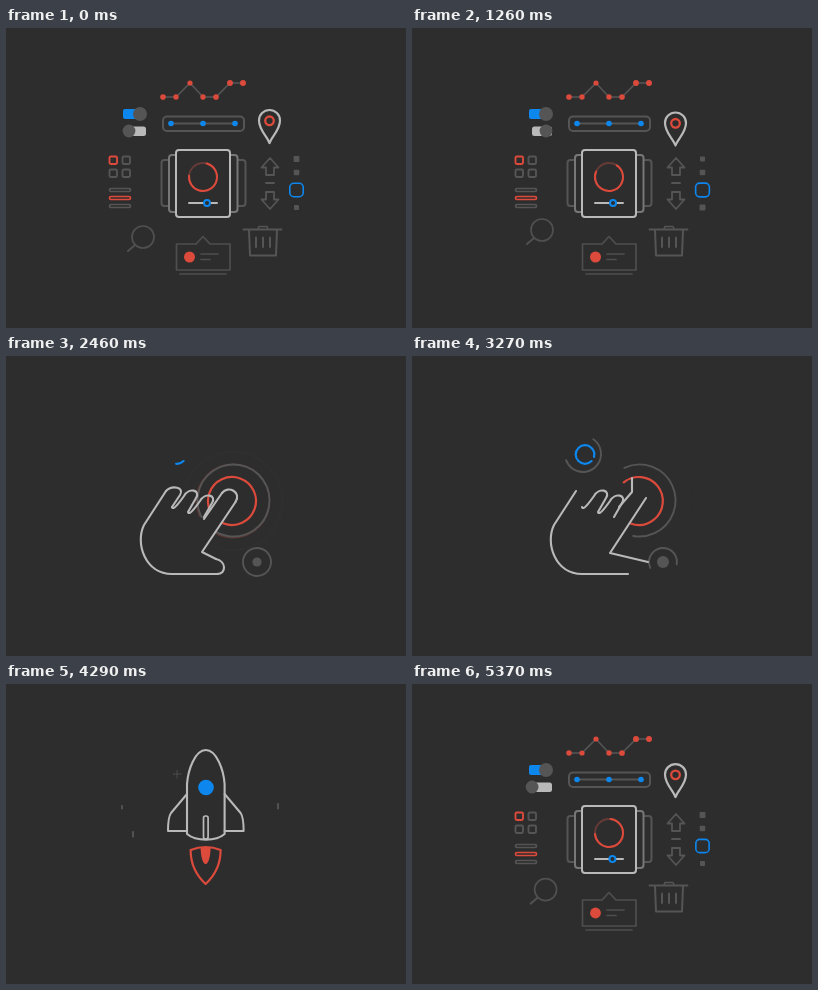
Recreate the animation shown at these times as an HTML page with a canvas. Size 400x300 px, loop 5.4 s.

```html
<!DOCTYPE html>
<html lang="en">
<head>
<meta charset="utf-8">
<style>
html, body { margin: 0; width: 100%; height: 100%; overflow: hidden; background: #2d2d2d; }
canvas { display: block; width: 400px; height: 300px; }
</style>
</head>
<body>
<canvas id="stage" width="400" height="300"></canvas>
<script>
const ctx = document.getElementById('stage').getContext('2d');
const LOOP = 5400, TAU = Math.PI * 2, RAD = Math.PI / 180;
const BG = '#2d2d2d', LIGHT = '#b9b9b9', MID = '#777', GREY = '#555', RED = '#dc4a3c', BLUE = '#0d87ee';

const clamp = v => Math.max(0, Math.min(1, v));
const part = (t, a, b) => clamp((t - a) / (b - a));
const smooth = v => v * v * (3 - 2 * v);
const mix = (a, b, k) => a + (b - a) * k;
const wave = (u, period) => Math.sin(u / period * TAU);

function stroke(path, color, width = 2) {
  ctx.strokeStyle = color;
  ctx.lineWidth = width;
  ctx.stroke(path);
}
function fill(path, color) {
  ctx.fillStyle = color;
  ctx.fill(path);
}
function poly(color, width, ...p) {
  const path = new Path2D();
  for (let i = 0; i < p.length; i += 2) path.lineTo(p[i], p[i + 1]);
  stroke(path, color, width);
}
function box(x, y, w, h, r) {
  const path = new Path2D();
  path.roundRect(x, y, w, h, r);
  return path;
}
function dot(x, y, r, color) {
  const path = new Path2D();
  path.arc(x, y, Math.max(0, r), 0, TAU);
  fill(path, color);
}
function arc(x, y, r, from, to, color, width = 2) {
  if (to <= from || r <= 0) return;
  const path = new Path2D();
  path.arc(x, y, r, from * RAD, Math.min(to, from + 360) * RAD);
  stroke(path, color, width);
}
function layer(alpha, draw) {
  if (alpha <= 0) return;
  ctx.save();
  ctx.globalAlpha *= alpha;
  draw();
  ctx.restore();
}
const trim = (k, length) => ctx.setLineDash(k < 1 ? [k * length, 999] : []);

// Interface icons; u is negative while they arrive.
const icons = [
  u => { // cards
    stroke(box(155.5, 132, 84, 46, 3), GREY);
    fill(box(163, 127, 68.5, 57, 3), BG);
    stroke(box(163, 127, 68.5, 57, 3), MID);
    fill(box(170, 122, 54, 67, 3), BG);
    stroke(box(170, 122, 54, 67, 3), LIGHT);
    const turn = -75 + u * 0.3;
    arc(197, 149, 14, 0, 360, '#653b37');
    arc(197, 149, 14, turn, turn + 260, RED);
    const x = 201 + 4 * wave(u, 1260);
    poly(LIGHT, 2, 183, 175, 211, 175);
    dot(x, 175, 3, BG);
    arc(x, 175, 3, 0, 360, BLUE);
  },
  u => { // chart
    const pts = [157, 69, 170, 69, 184, 55, 197, 69, 210, 69, 224, 55, 237, 55];
    poly(GREY, 1.6, ...pts);
    for (let i = 0; i < 14; i += 2) dot(pts[i], pts[i + 1], 2.8 + 0.2 * wave(u - i * 40, 630), RED);
  },
  u => { // range bar
    stroke(box(157, 88.5, 81, 14.5, 4), GREY);
    poly(GREY, 2, 165, 95.5, 229, 95.5);
    for (const x of [165, 197, 229]) dot(x, 95.5, 2.8, BLUE);
  },
  u => { // toggles
    fill(box(117, 81, 20, 10, 2), BLUE);
    dot(134, 86, 7, GREY);
    const x = u < 0 ? 120 + 3 * part(u, -30, 0) : mix(123, 134, smooth(part(u, 0, 210)));
    fill(box(120, 98.5, 20, 9.5, 2.5), LIGHT);
    dot(x, 103, 6.4, GREY);
  },
  u => { // map pin
    const y = u < 0 ? -2 * clamp(-u / 30) : 2.5 * wave(u, 1008);
    ctx.translate(0, y);
    stroke(new Path2D('M263.5 115C261 108 253 102 253 92.5a10.5 10.5 0 0 1 21 0C274 102 266 108 263.5 115z'), LIGHT, 2.2);
    arc(263.5, 92.8, 4.3, 0, 360, RED, 2.3);
  },
  u => { // grid and list
    for (const x of [103.5, 116.5])
      for (const y of [128.5, 141.5])
        stroke(box(x, y, 7.5, 7.5, 1.2), x + y < 240 ? RED : GREY, 1.9);
    for (const y of [160.5, 168.5, 176.5])
      stroke(box(103.5, y, 21, 3, 1.5), y === 168.5 ? RED : GREY, 1.7);
  },
  u => { // arrows
    stroke(new Path2D('M264 130l8.5 9.5h-4.5v7.5h-8v-7.5h-4.5z'), GREY, 1.8);
    stroke(new Path2D('M264 181l8.5-9.5h-4.5v-7.5h-8v7.5h-4.5z'), GREY, 1.8);
    poly(GREY, 2, 260, 155, 268, 155);
  },
  u => { // pager
    [131, 144.5, 179.5].forEach((y, i) => {
      const s = 5.4 + 0.5 * wave(u + 200 - i * 150, 900);
      fill(box(290.5 - s / 2, y - s / 2, s, s, 1), GREY);
    });
    const s = 13.4 + 0.6 * wave(u, 900);
    stroke(box(290.5 - s / 2, 162 - s / 2, s, s, 4), BLUE, 1.6);
  },
  u => { // magnifier
    const d = u < 0 ? -3.5 * clamp(-u / 30) : -7 * Math.sin(Math.PI * u / 840) ** 2;
    ctx.translate(d, d);
    arc(137, 209, 11, 0, 360, '#505050', 1.7);
    poly('#505050', 2, 129, 217, 122, 223);
  },
  u => { // callout
    poly('#4e4e4e', 1.7, 190, 216, 170.5, 216, 170.5, 242, 224, 242, 224, 216, 204, 216, 197, 208.5, 190, 216);
    dot(183.5, 229, 5.5 + 0.3 * wave(u, 630), RED);
    poly('#4e4e4e', 1.7, 195, 226, 212, 226);
    poly('#4e4e4e', 1.7, 195, 231.5, 204, 231.5);
    poly('#4e4e4e', 1.7, 174, 246, 220, 246);
  },
  u => { // bin
    poly(GREY, 1.8, 237.5, 201.5, 275.5, 201.5);
    poly(GREY, 1.6, 252, 201, 253, 198.5, 261, 198.5, 262, 201);
    poly(GREY, 2, 243, 202, 244, 227.5, 270, 227.5, 271, 202);
    for (const x of [250, 257, 264]) poly(GREY, 2, x, 209.5, x, 219);
  }
];

function drawIcons(t) {
  const u = t > 2700 ? t - LOOP : t;
  icons.forEach((draw, i) => {
    const k = u < 0
      ? 1 - (1 - part(u, -360 + i * 9, -60 + i * 2)) ** 3
      : 1 - smooth(part(u, 1310 + (10 - i) * 15, 1570 + (10 - i) * 15));
    layer(k, () => {
      ctx.translate(200, 150);
      ctx.scale(k, k);
      ctx.translate(-200, -150);
      draw(u);
    });
  });
}

function drawRings(t) {
  const grow = smooth(part(t, 1650, 2040)), e = part(t, 3150, 3450);
  const open = (x, y, r, end, color) => {
    const from = end - 360 + 360 * e;
    arc(x, y, r, from, from + 360 * grow * (1 - e), color, 1.9);
  };
  for (const start of [2040, 2250, 2600, 2780]) {
    const p = part(t, start, start + 500);
    if (p > 0 && p < 1)
      layer((1 - p) * 0.45, () => arc(227, 145, mix(24, 54, p), 0, 360, p < 0.65 ? RED : GREY, 1.5));
  }
  open(227.5, 144.5, 36, 100, GREY);
  const tap = smooth(part(t, 2010, 2220)), cut = -250 + 360 * e ** 1.2;
  arc(mix(226, 228, e), 145, 24 * tap, cut, 110, RED, 2.2);
  open(171, 98, 18, 160, GREY);
  open(251, 206, 14, 10, GREY);
  const fade = 1 - part(t, 3300, 3450);
  layer(fade, () => dot(251, 206, mix(4.6, 6, part(t, 2700, 3200)) * grow, GREY));
  const sweep = clamp((t - 2315) * 0.346 / 330) * 330;
  if (t < 3300) arc(mix(171, 173, part(t, 2460, 3270)), 98.5, 9.3, 95 - Math.min(50, sweep), 45 + sweep, BLUE, 2.2);
}

function drawHand(t) {
  const draw = smooth(part(t, 1600, 2040)), bend = smooth(part(t, 3060, 3250));
  const fade = 1 - part(t, 3310, 3460);
  const whole = new Path2D('M160 135L138 169C129 187 139 218 166 218H211C221 218 221 205 210 203L196 197L230 146C236 136 222 128 216 137L199 163L181 157L166 151z');
  const lines = (a, b) => poly(LIGHT, 2.1, ...a.map((v, i) => mix(v, b[i], bend)));
  const fingers = new Path2D();
  fingers.moveTo(166, 151);
  for (let i = 0; i < 2; i++) {
    const x = 16 * i, y = 5 * i;
    fingers.bezierCurveTo(167 + x, 155 + y, 173 + x, 147 + y, 178 + x, 140 + y);
    fingers.bezierCurveTo(183 + x, 131 + y, 195 + x, 134 + y, 190 + x, 142 + y);
    fingers.lineTo(182 + x, 156 + y);
  }
  layer(fade, () => {
    layer(draw * (1 - bend), () => fill(whole, BG));
    trim(draw, 230);
    ctx.save();
    ctx.translate(4 * bend, 0);
    stroke(new Path2D('M160 135L138 169C129 187 139 218 166 218H212'), LIGHT, 2.1);
    stroke(fingers, LIGHT, 2.1);
    layer(1 - bend, () => {
      stroke(new Path2D('M160 135C166 129 179 131 174 139L166 151'), LIGHT, 2.1);
      stroke(new Path2D('M216 137C222 129 236 136 229.5 146'), LIGHT, 2.1);
      stroke(new Path2D('M210 203C220 205 221 218 211 218'), LIGHT, 2.1);
    });
    ctx.restore();
    trim(draw, 110);
    lines([198, 163, 216, 137, 216, 137], [207, 151, 220, 136, 220, 122]);
    lines([229.5, 146, 196, 196, 210, 203], [234, 142, 198, 197, 236, 206]);
  });
}

// x, y, time of full length, length
const streaks = [
  [116, 132, 3840, 10], [146, 170, 3840, 19], [258, 164, 3840, 4],
  [116, 123, 4290, 3], [127, 150, 4290, 5], [272, 122, 4290, 5]
];

function drawStreaks(t) {
  for (const [x, y, peak, length] of streaks) {
    const p = ((t - peak + 1350) % 900 - 450) / 300 + 0.5;
    if (p <= 0 || p >= 1) continue;
    const h = length * Math.sin(p * Math.PI) / 2, cy = y + 50 * (p - 0.5);
    poly('#686868', 1.3, x, cy - h, x, cy + h);
  }
  layer(0.4 * (1 - clamp(Math.abs(t - 4290) / 150)), () => {
    poly(MID, 1, 167, 90, 175, 90);
    poly(MID, 1, 171, 86, 171, 94);
  });
}

function drawClouds(t) {
  const inK = part(t, 3570, 3750), e = part(t, 3750, 4020);
  const puff = (x, y, r, from, to) => arc(x, y, r, from + 120 * e, mix(from, to, inK) - 120 * e, RED, 1.3);
  puff(206, 232, 17, 170, 410);
  puff(237, 220, 18, 145, 315);
  puff(257, 204, 19, 120, 420);
}

function drawRocket(t) {
  const draw = smooth(part(t, 3300, 3540)), fade = 1 - smooth(part(t, 4950, 5130));
  layer(fade, () => {
    ctx.translate(t < 3600 ? 0 : 0.3 * wave(t - 4290, 180), -0.6 * (1 - part(t, 3840, 4200)));
    trim(draw, 260);
    for (const side of [1, -1]) {
      ctx.save();
      if (side < 0) { ctx.translate(399.6, 0); ctx.scale(-1, 1); }
      stroke(new Path2D('M181 110L165 129Q162 133 162 147H181'), LIGHT, 2);
      ctx.restore();
    }
    stroke(new Path2D('M181 150V100C182 86 189 66 199.8 66C210.6 66 217.6 86 218.6 100V150C210 157.5 190 157.5 181 150'), LIGHT, 2.1);
    stroke(box(197.5, 132, 4.6, 23, 2), LIGHT, 1.7);
    ctx.setLineDash([]);
    const k = smooth(part(t, 3300, 3480));
    dot(mix(173, 200, k), mix(98.5, 103.5, k), mix(9.5, 7.8, k), BLUE);
    const burn = smooth(part(t, 3480, 3660));
    layer(burn, () => {
      ctx.translate(199.6, 163);
      ctx.scale(1, burn * (1.02 - 0.035 * wave(t - 4200, 360)));
      stroke(new Path2D('M-15 3Q0-3 15 3C15 20 8 30 0 37.5C-8 30-15 20-15 3z'), RED, 2.2);
      fill(new Path2D('M-5 0H5C5 9 3 17 0 17.5C-3 17-5 9-5 0z'), RED);
    });
  });
}

function flash(t) {
  const a = t < 3720 ? part(t, 3510, 3720) : 1 - part(t, 3720, 4110);
  layer(a * 0.62, () => {
    ctx.fillStyle = '#e04c3d';
    ctx.fillRect(0, 0, 400, 300);
  });
}

function render(t) {
  ctx.fillStyle = BG;
  ctx.fillRect(0, 0, 400, 300);
  ctx.lineCap = ctx.lineJoin = 'round';
  if (t < 1800 || t > 5000) drawIcons(t);
  if (t > 1600 && t < 3480) {
    drawRings(t);
    drawHand(t);
  }
  if (t > 3600 && t < 5050) drawStreaks(t);
  if (t > 3300 && t < 5130) drawRocket(t);
  flash(t);
  if (t > 3570 && t < 4020) drawClouds(t);
}

const begin = performance.now();
function tick() {
  render((performance.now() - begin) % LOOP);
  requestAnimationFrame(tick);
}
tick();
</script>
</body>
</html>
```
